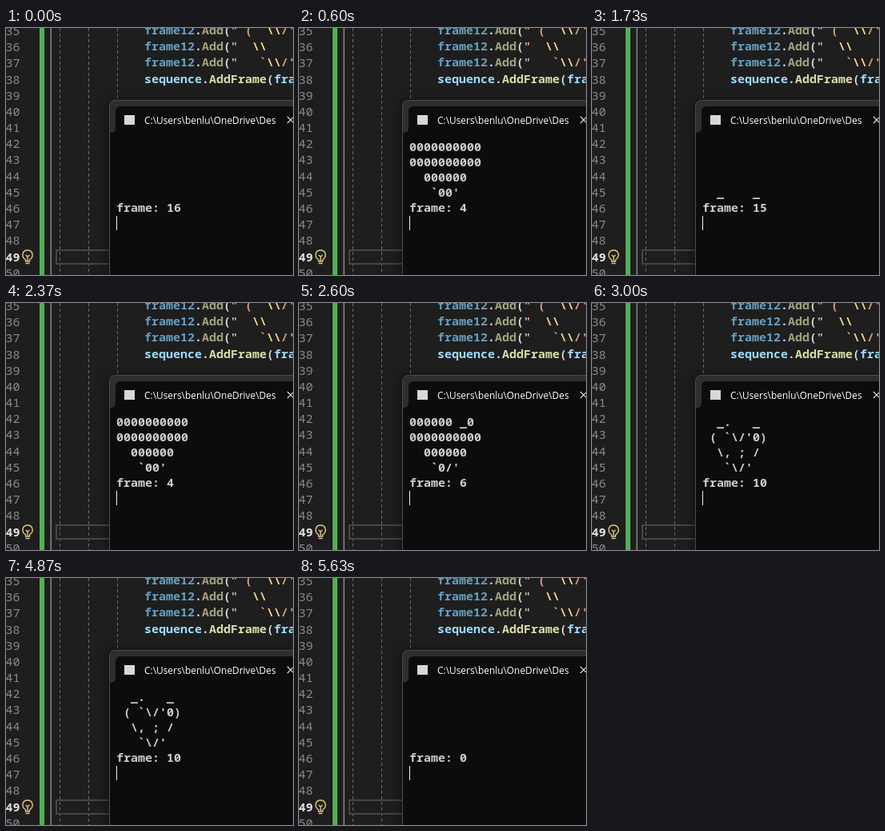
These frames come from a looping animation (359 px wide and 309 px high, 5660 ms). An HTML page:

```html
<!DOCTYPE html>
<html lang="en">
<head>
<meta charset="utf-8">
<title>Console heart</title>
<style>
  html, body { margin: 0; width: 100%; height: 100%; overflow: hidden; background: #1e1e1e; }
  svg { display: block; width: 359px; height: 309px; }
  text { white-space: pre; font: 500 15px "Noto Sans Mono", "DejaVu Sans Mono", monospace; }
  .num { fill: #8a8a8a; text-anchor: end; }
  .now { fill: #e4e4e4; font-weight: 700; }
  .code { font-weight: 600; fill: #d4d4d4; }
  .var { fill: #679fc0; }
  .add { fill: #a3a380; }
  .obj { fill: #9cdcfe; }
  .call { fill: #dcdcaa; }
  .str { fill: #d69d85; }
  .esc { fill: #ffd68f; }
  .out { fill: #cccccc; font-weight: 600; }
  .title { fill: #fff; font: 500 11.9px "Open Sans", "Noto Sans", sans-serif; }
  .guide { stroke: #6a6a6a; stroke-dasharray: 4 3; }
  .window { filter: drop-shadow(0 3px 8px #0009); }
</style>
</head>
<body>
<svg viewBox="0 0 359 309">
  <rect width="359" height="309" fill="#1e1e1e"/>
  <rect x="42" width="6" height="309" fill="#54b054"/>
  <rect x="55.500" width="1.500" height="309" fill="#858585"/>
  <path class="guide" d="M67.500 0V309M103.500 0V309M139.500 0V90"/>
  <rect x="63" y="278" width="80" height="17" fill="none" stroke="#464646" stroke-width="2"/>
  <g id="editor"></g>

  <!-- light bulb -->
  <g fill="none" stroke="#e8c77b" stroke-width="1.400">
    <path d="M24.500 290C18.500 286 20.500 278 27 278S35.500 286 29.500 290V292H24.500Z"/>
    <path d="M24.500 284L27 286L29.500 284M27 286V291"/>
    <path d="M24.500 294.500H29.500" stroke="#d0d0d0"/>
  </g>

  <!-- console window -->
  <path class="window" d="M129.500 312V98.500Q129.500 90.500 137.500 90.500H362V312Z" fill="#2e2e2e" stroke="#4a4a4a"/>
  <path d="M130 131Q137 131 137 125V105Q137 98 144 98H359V309H130Z" fill="#0c0c0c"/>
  <rect x="148" y="109" width="13" height="12" fill="#d8d8d8"/>
  <text class="title" x="173" y="120">C:\Users\benlu\OneDrive\Des</text>
  <path d="M352 111L360 119M360 111L352 119" stroke="#e0e0e0" stroke-width="1.200"/>
  <g id="console"></g>
  <rect id="cursor" x="138" y="235" width="1" height="18" fill="#f0f0f0"/>
</svg>
<script>
const LOOP = 5660, STEP = 108.5, FIRST = 70, FRAMES = 17, BLINK = 680;
const $ = id => document.getElementById(id);

function addText(parent, x, y, cls, content = "") {
  const el = document.createElementNS("http://www.w3.org/2000/svg", "text");
  el.setAttribute("x", x);
  el.setAttribute("y", y);
  el.setAttribute("class", cls);
  el.textContent = content;
  parent.append(el);
  return el;
}

// Editor: line numbers and code made of [class, text] runs
const lineY = n => 9 + (n - 35) * 20.18;
for (let n = 35; n <= 50; n++) addText($("editor"), 17.5, lineY(n), n === 49 ? "num now" : "num", n);

function addCode(n, runs) {
  let col = 0;
  for (const [cls, s] of runs) {
    addText($("editor"), 173 + col * 9, lineY(n) - 1, "code " + cls, s);
    col += s.length;
  }
}
const add = [["var", "frame12"], ["", "."], ["add", "Add"], ["", "("]];
const slashes = ["esc", "\\\\"];
addCode(35, [...add, ["str", "\" ( `"], slashes, ["str", "/'"]]);
addCode(36, [...add, ["str", "\"  "], slashes]);
addCode(37, [...add, ["str", "\"   `"], slashes, ["str", "/'"]]);
addCode(38, [["obj", "sequence"], ["", "."], ["call", "AddFrame"], ["", "("], ["obj", "fram"]]);

// Console art: a shot rises, bursts, cools into a heart and sinks away
const burst = ["0000000000", "0000000000", "  000000", "    00"];
const embers = ["  _.   _", " ( `\\/'0)", "  \\, ; /", "   `\\/'"];
const heart = embers.map(row => row.replace(/[.,;0]/g, " "));

function noise(row, col) {
  const n = Math.sin(row * 12.9 + col * 78.2 + 1) * 43758.5;
  return n - Math.floor(n);
}

function cool(row, r, heat) {
  return [...row.padEnd(10)].map((c, i) => burst[r][i] === "0" && noise(r, i) < heat ? "0" : c).join("");
}

function artRow(frame, r) {
  if (frame < 4) {
    const head = 4 - frame;
    return r === head ? "    0" : r === head + 1 ? "    |" : "";
  }
  if (frame <= 10) return cool(embers[r], r, (10 - frame) / 6);
  return heart[r - Math.max(0, frame - 12)] || "";
}

const rows = [0, 1, 2, 3, 4].map(i => addText($("console"), 138, 154 + i * 19, "out"));
const start = performance.now();

function draw(now) {
  const t = Math.max(0, now - start) % LOOP;
  const frame = (Math.floor((t - FIRST) / STEP) + FRAMES) % FRAMES;
  rows.forEach((row, r) => {
    const line = r < 4 ? artRow(frame, r) : "frame: " + frame;
    if (row.textContent !== line) row.textContent = line;
  });
  $("cursor").setAttribute("opacity", (t + 50) % BLINK < 45 ? 0 : 1);
  requestAnimationFrame(draw);
}
draw(start);
</script>
</body>
</html>
```
